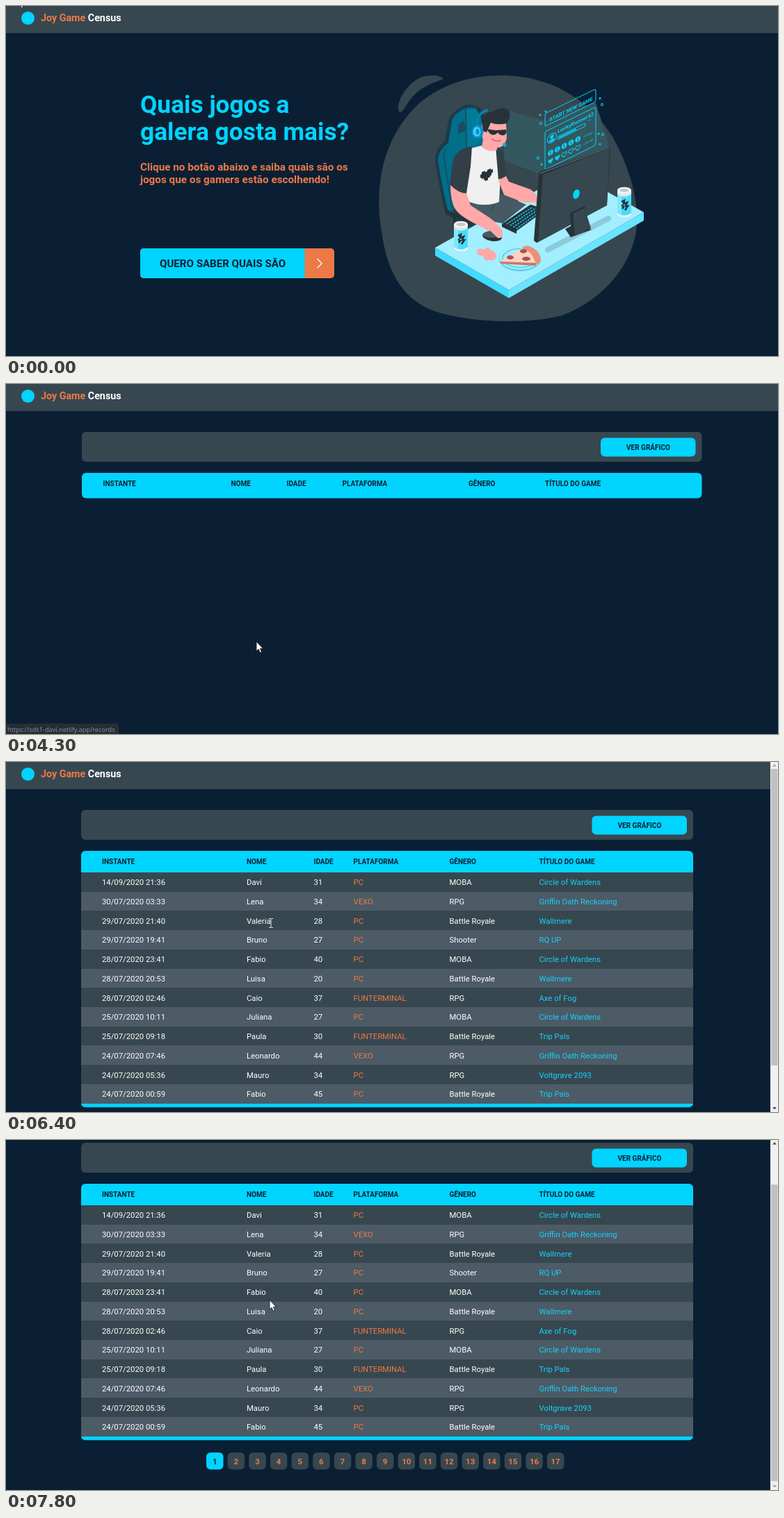
An HTML page for the animation above (8000 ms loop, 1110 by 504 pixels).

```html
<!DOCTYPE html>
<html lang="pt-BR">
<head>
<meta charset="utf-8">
<title>Joy Game Census</title>
<style>
  html, body { margin: 0; width: 100%; height: 100%; overflow: hidden; background: #0b1f34; }
  svg { display: block; width: 1110px; height: 504px; font-family: Roboto, sans-serif; }
  .bold { font-weight: 700; }
  .head { font-weight: 700; font-size: 10px; fill: #0b1f34; }
  .mid { text-anchor: middle; }
  .cell { font-size: 11.3px; fill: #fff; }
  .row { shape-rendering: crispEdges; }
  .holo { fill: none; stroke: #00d4ff; stroke-width: 1; }
  .holo text, .holo .solid { fill: #00d4ff; stroke: none; }
</style>
</head>
<body>
<svg viewBox="0 0 1110 504">
  <rect width="1110" height="504" fill="#0b1f34"/>
  <g id="page">
    <rect width="1110" height="39" fill="#37474f"/>
    <circle cx="31.5" cy="17.5" r="9.5" fill="#00d4ff"/>
    <text x="50" y="22" class="bold" font-size="14.3" fill="#ed7947">Joy Game <tspan fill="#fff">Census</tspan></text>
    <g id="home">
      <g class="bold">
        <g font-size="35.3" fill="#00d4ff"><text x="193" y="154">Quais jogos a</text><text x="193" y="193">galera gosta mais?</text></g>
        <g font-size="15.25" fill="#ed7947"><text x="193" y="237">Clique no botão abaixo e saiba quais são os</text><text x="193" y="254.5">jogos que os gamers estão escolhendo!</text></g>
      </g>
      <rect x="193" y="349" width="279" height="43" rx="5" fill="#ed7947"/>
      <path id="button" d="M429.500 349H198a5 5 0 0 0-5 5v33a5 5 0 0 0 5 5h231.500z"/>
      <text x="221" y="376" class="bold" font-size="15.1" fill="#0b1f34">QUERO SABER QUAIS SÃO</text>
      <path d="M447.500 364l6.500 6.700-6.500 6.700" fill="none" stroke="#fff" stroke-width="1.300"/>
      <g id="art"></g>
    </g>
    <g id="empty"></g>
    <g id="full"></g>
  </g>
  <g id="scrollbar">
    <rect x="1099" width="11" height="504" fill="#f1f1f1"/>
    <rect id="thumb" x="1100" width="9.500" height="427" fill="#c1c1c1"/>
    <path id="up" d="M1102 6.500l3-3.500 3 3.500z"/>
    <path id="down" d="M1102 497l3 3.500 3-3.500z"/>
  </g>
  <g id="status">
    <path d="M0 489H159q3 0 3 3v12H0z" fill="#292d32"/>
    <text x="2" y="501" font-family="Open Sans, sans-serif" font-size="9.2" fill="#8497b4">https://sds1-davi.netlify.app/records</text>
  </g>
  <g id="cursor">
    <path id="arrow" d="M0 0V13.500L3.100 10.700 5.200 15.800 7.500 14.800 5.400 9.900H9.600z" fill="#fff" stroke="#111" stroke-width=".8"/>
    <path id="hand" d="M-1.500 1Q.2-1 2 1V7L7.500 8.500Q9 9 9 11V14L7 19.500H0L-5 12.500Q-5 9.800-3 10.500L-1.500 12z" fill="#fff" stroke="#111"/>
    <path id="beam" d="M-3-6.500H-.8L0-5.800.8-6.500H3M0-5.800V6M-3 6.500H-.8L0 5.800.8 6.500H3" fill="none" stroke="#e4e8ea"/>
  </g>
</svg>
<script>
const el = id => document.getElementById(id);
const CYAN = '#00d4ff', SLATE = '#37474f', DARK = '#263238', SKIN = '#ffa8a7', ORANGE = '#ed7947';
const shape = (fill, d, extra = '') => `<path fill="${fill}" d="${d}" ${extra}/>`;
const line = (color, width, d, extra = '') => `<path fill="none" stroke="${color}" stroke-width="${width}" d="${d}" ${extra}/>`;
const oval = (fill, x, y, rx, ry, extra = '') => `<ellipse fill="${fill}" cx="${x}" cy="${y}" rx="${rx}" ry="${ry}" ${extra}/>`;
const box = (fill, x, y, w, h, r = 0, extra = '') => `<rect fill="${fill}" x="${x}" y="${y}" width="${w}" height="${h}" rx="${r}" ${extra}/>`;
const text = (cls, x, y, s, extra = '') => `<text class="${cls}" x="${x}" y="${y}" ${extra}>${s}</text>`;
const repeat = (n, f) => Array.from({ length: n }, (_, i) => f(i)).join('');

const can = (x, y) => `<g transform="translate(${x} ${y})">` +
  oval('#e6f2f5', 0, 38.5, 10.5, 5) + shape('#4adcfb', 'M-10 8V37Q0 44 10 37V8z') +
  shape('#7fe7fd', 'M-10 8V37L-4 40V10z') + shape('#e3e7e8', 'M-10 4V10Q0 17 10 10V4z') +
  oval('#f5f5f5', 0, 4.5, 10, 4.8) + oval('#c3cbce', 0, 4.5, 6.5, 2.6) +
  line(DARK, 2.6, 'M-4 21l4-2-1 5 5-2-2 5 3 0-4 6M-4 26l3 2-2 3') + '</g>';

const backdrop = () =>
  shape(SLATE, 'M712 100C788 100 844 140 873 190C895 230 909 275 907 315C903 372 857 425 798 446C745 459 665 456 615 439C565 420 547 375 540 325C528 255 545 190 588 146C622 113 668 100 712 100z') +
  shape(SLATE, 'M566 153C558 143 575 111 598 102Q622 97 629 105C617 110 600 114 586 129C575 141 572 153 566 153z') +
  shape('#33575f', 'M722 151L775 165 848 139 868 205 767 242 715 222z');

const chair = () =>
  shape('#1c3c4b', 'M648 150Q656 141 668 142L682 147 692 165 700 300 669 319 632 300Q622 260 617 222 616 207 631 194L636 165Q640 154 648 150z') +
  shape('#006f8a', 'M651 153Q661 144 675 147L683 160 686 200 652 215 643 302 635 293Q626 255 621 222 622 208 636 197L641 166Q644 157 651 153z') +
  shape('#007b98', 'M662 149L676 148 685 170 682 196 664 206 658 166z') +
  shape('#194f62', 'M650 170l9-5 2 14-11 5z') + line('#194f62', 2, 'M632 206Q628 216 631 228L643 300M661 148L662 205') +
  line(DARK, 4, 'M632 294L668 313M645 300v18');

const person = () =>
  shape('#455a64', 'M658 278L710 270 748 286 714 313 668 304z') + line(SLATE, 1.5, 'M697 294Q706 283 702 276') +
  shape('#f0f0f0', 'M664 206L688 200 704 202Q713 210 712 228L709 282Q686 292 659 279z') +
  shape('#323f47', 'M670 202Q645 206 642 226L638 257Q650 269 662 270L668 231z') +
  shape('#323f47', 'M704 202Q715 207 717 220L719 244 708 250z') +
  shape(SKIN, 'M686 192L707 198 706 207Q696 212 684 203z') +
  shape(SKIN, 'M639 258Q650 269 662 270L668 287 694 304Q708 314 714 325 715 336 707 334L688 320Q652 304 645 291 639 279 639 258z') +
  shape(SKIN, 'M708 251L719 245 723 253 754 264Q767 273 765 283L744 283 716 272z') +
  shape(SKIN, 'M684 170Q702 157 719 168L720 190Q717 204 706 204 690 202 685 191z') +
  shape(DARK, 'M686 180L684 166Q688 153 700 152 712 144 722 149 728 158 720 169 706 172 697 168L691 182z') +
  line('#0086a8', 3.5, 'M677 175Q675 154 693 150') +
  oval('#0390d0', 678, 181, 8.5, 9.5) + oval('#4ac8fa', 677, 181, 5.5, 7) + oval('#0390d0', 678, 181, 2.5, 4) +
  shape(DARK, 'M690 177l14 2 15-1q2 6-3 8-6 1-9-4-4 5-9 3-4-2-6-7z') +
  line('#b95d69', 1.2, 'M698 191q8 6 14 2') + oval('#0aa9e0', 717, 200, 2.5, 3) +
  shape(DARK, 'M-10-2h2v-3h5v2h3v-2h5v2h3v5h-2v3h-2v2h-3v3h-4v-2h-2v-3h-3v-2h-2z', 'transform="matrix(1 -.4 0 1 692 241)"');

const monitor = () =>
  line('#8bcbdb', 8, 'M779 351L866 306', 'stroke-linecap="round"') +
  shape(DARK, 'M804 321L820 313 842 322 812 333z') +
  shape(DARK, 'M766 241Q767 238 771 237L866 203Q869 204 869 207L864 287 763 341 759 338z') +
  shape(SLATE, 'M772 243L868 205 864 287 765 340z') +
  line('#455a64', 2, 'M768 241L866 204') + oval(CYAN, 820, 271, 4.5, 7, 'transform="rotate(18 820 271)"') +
  shape(DARK, 'M811 298L832 288 838 318 813 330z') + shape(SLATE, 'M815 299L832 291 841 320 818 331z');

const desk = () =>
  shape('#a3eeff', 'M617 348L812 238 917 297 723 409z') +
  shape('#40dbff', 'M617 348L723 409V420.500L617 359.500z') + shape('#69e4ff', 'M723 409L917 297V309L723 420.500z');

const deskItems = () =>
  shape(DARK, 'M713 314L754 286 777 293 734 324V328L713 318z') +
  repeat(4, i => line('#12bfe6', 1.8, `M${720 + i * 4.7} ${314 + i * 2.3}L${757 + i * 4.5} ${289.5 + i * 1.5}`, 'stroke-dasharray="2.6 1.4"')) +
  oval(DARK, 699, 332, 14, 6.5, 'transform="rotate(9 699 332)"') + oval('#455a64', 698, 329, 12, 5) +
  shape(SKIN, 'M684 312L694 304Q708 314 714 325 715 336 707 334z');

const food = () =>
  oval('#5fcfe6', 739, 364, 30, 18) + oval('#a3eeff', 739, 362.5, 29.5, 17) +
  oval('none', 739, 363, 25, 13.5, 'stroke="#35c9ea" stroke-width="1.2"') +
  shape('#ffd1bd', 'M710 368L747 346 766 366 763 371z') + shape('#c97865', 'M710 368L763 370 761 374 711 371z') +
  shape('#e79079', 'M743 347Q750 343 757 348 771 355 768 370 762 374 759 364 754 352 743 350z') +
  oval('#a9505a', 744, 353, 5, 3) + oval('#a9505a', 748, 364, 6, 3) + oval('#a9505a', 725, 362, 5, 3) +
  shape(SKIN, 'M677 352q3-5 10-1 5-7 9 0 8 2 9 9-1 7-10 6-8 2-9-6-9 0-9-8z');

const sparkles = [[768, 157], [776, 152], [854, 133], [770, 228], [852, 184], [854, 199]];
const rings = [[857, 142], [769, 169], [765, 219], [858, 185]];
const hologram = () => `<g class="holo"><g transform="matrix(1 -.49 0 1 775 155)">
  <rect width="73" height="18.500" rx="3"/><rect y="26" width="73" height="55" rx="3"/>
  <text class="bold" x="6" y="14.500" font-size="7.400">START NEW GAME</text>
  <circle cx="10" cy="40" r="6.500"/><circle class="solid" cx="10" cy="38" r="2.700"/><path class="solid" d="M5.500 43q4.500-4 9 0-4.500 5-9 0z"/>
  <text class="bold" x="18" y="37" font-size="7.400">LuckyRunner42</text>
  <rect x="18" y="42" width="40" height="4.500" rx="2"/><path d="M20 44.200h25" stroke-width="2"/>
  <text x="62" y="42" font-size="4">x9</text>
  ${repeat(5, i => `<circle class="solid" cx="${8 + i * 9.8}" cy="60" r="3.900"/><path stroke="#33575f" d="M${8 + i * 9.8} 57.500v5"/>`)}
  ${repeat(5, i => `<path ${i < 2 ? 'class="solid"' : ''} d="M${8 + i * 9.8} 76l-3.700-4q0-4 3.700-2 3.700-2 3.700 2z"/>`)}
  <text x="55" y="62" font-size="4.500">+5 Exp</text><text x="55" y="73" font-size="4.500">+20 HP</text></g>
  ${sparkles.map(([x, y]) => `<path d="M${x - 2} ${y}h4m-2-2v4"/>`).join('')}
  ${rings.map(([x, y]) => `<circle cx="${x}" cy="${y}" r="1.700"/>`).join('')}</g>`;

el('art').innerHTML = backdrop() + hologram() + chair() + desk() + person() + deskItems() +
  monitor() + can(654, 310) + can(889, 261) + food();

// Records: instant, name, age, then initials of platform, genre and title
const genres = { M: 'MOBA', R: 'RPG', B: 'Battle Royale', S: 'Shooter' };
const platforms = { P: 'PC', V: 'VEXO', F: 'FUNTERMINAL' };
const titles = {
  C: 'Circle of Wardens', G: 'Griffin Oath Reckoning', W: 'Wallmere', R: 'RQ UP',
  A: 'Axe of Fog', T: 'Trip Pals', N: 'Voltgrave 2093'
};
const records = `14/09 21:36 Davi 31 PMC
30/07 03:33 Lena 34 VRG
29/07 21:40 Valeria 28 PBW
29/07 19:41 Bruno 27 PSR
28/07 23:41 Fabio 40 PMC
28/07 20:53 Luisa 20 PBW
28/07 02:46 Caio 37 FRA
25/07 10:11 Juliana 27 PMC
25/07 09:18 Paula 30 FBT
24/07 07:46 Leonardo 44 VRG
24/07 05:36 Mauro 34 PRN
24/07 00:59 Fabio 45 PBT`.split('\n').map(row => {
  const [day, hour, name, age, [p, g, t]] = row.split(' ');
  return [`${day}/2020 ${hour}`, name, age, platforms[p], genres[g], titles[t]];
});
const headings = ['INSTANTE', 'NOME', 'IDADE', 'PLATAFORMA', 'GÊNERO', 'TÍTULO DO GAME'];
const cellColors = ['#fff', '#fff', '#fff', ORANGE, '#fff', '#17d2fb'];
const ROW = 27.72;

const table = (left, width, columns, rows) =>
  box(SLATE, left, 69, width, 43, 6) + box(CYAN, left + width - 145.5, 77.5, 136.5, 27, 6) +
  text('head mid', left + width - 77, 94.5, 'VER GRÁFICO') +
  box(CYAN, left, 128, width, 36.5 + rows.length * ROW, 6) +
  headings.map((h, i) => text('head', columns[i], 147, h)).join('') +
  rows.map((row, r) => box(r % 2 ? '#4c5b66' : SLATE, left, 159 + r * ROW, width, ROW, 0, 'class="row"') +
    row.map((s, i) => text('cell', columns[i], 177.3 + r * ROW, s, `style="fill:${cellColors[i]}"`)).join('')).join('');

const pagination = () => repeat(17, i => {
  const x = 288 + i * 30.62;
  return box(i ? SLATE : CYAN, x, 515, 24.5, 24.5, 6) +
    text('bold mid', x + 12.2, 531.5, i + 1, `font-size="11.5" fill="${i ? ORANGE : '#0b1f34'}"`);
});

el('empty').innerHTML = table(109, 891.5, [139.5, 323.5, 403.5, 483.5, 665, 775], []);
el('full').innerHTML = table(108, 880, [138, 346, 442.5, 499.5, 637.5, 766.5], records) + pagination();

const show = (id, on) => el(id).style.display = on ? '' : 'none';
const ease = p => p * p * (3 - 2 * p);

// The pointer is sampled every 100 ms: [start, steps, x, y]
const moves = [[600, 7, 360, 371], [4500, 7, 90, 190], [6300, 2, 381, 232]];
function pointerAt(t) {
  let x = 17, y = -13;
  for (const [start, steps, toX, toY] of moves) {
    if (t < start) break;
    const p = ease(Math.min(1, (Math.floor((t - start) / 100) + 1) / steps));
    x += (toX - x) * p;
    y += (toY - y) * p;
  }
  return [x, y];
}

function draw(t) {
  const home = t < 4300, loaded = t >= 5200;
  const scroll = t >= 7500 ? 65 : t >= 7400 ? 42.5 : 0;
  let [x, y] = pointerAt(t);
  const hover = home && x > 193 && x < 472 && y > 349 && y < 392;
  const kind = hover && t < 4200 ? 'hand' : t >= 6400 && t < 7800 ? 'beam' : 'arrow';
  if (t >= 7800) [x, y] = [379, 230.5];

  show('home', home);
  show('empty', !home && !loaded);
  show('full', loaded);
  show('scrollbar', loaded);
  show('status', t >= 1400 && t < 4500);
  for (const id of ['arrow', 'hand', 'beam']) show(id, id === kind);
  el('button').setAttribute('fill', hover ? '#06c7f1' : CYAN);
  el('page').setAttribute('transform', `translate(0 ${-scroll})`);
  el('thumb').setAttribute('y', 10 + scroll * .835);
  el('up').setAttribute('fill', scroll ? '#505050' : '#a3a3a3');
  el('down').setAttribute('fill', scroll === 65 ? '#a3a3a3' : '#505050');
  el('cursor').setAttribute('transform', `translate(${x} ${y})`);
}

function tick() {
  draw(performance.now() % 8000);
  requestAnimationFrame(tick);
}
tick();
</script>
</body>
</html>
```
